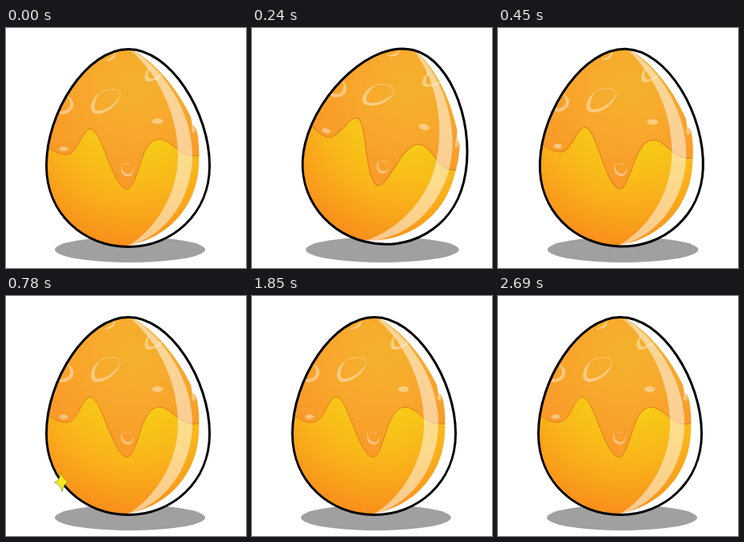
An HTML page for the animation above (3120 ms loop, 300 by 300 pixels).

```html
<!DOCTYPE html>
<html lang="en">
<head>
<meta charset="utf-8">
<title>Golden egg</title>
<style>
html, body { margin: 0; width: 100%; height: 100%; overflow: hidden; background: #fff; }
svg { display: block; width: 100vw; height: 100vh; }
</style>
</head>
<body>
<svg viewBox="0 0 300 300">
  <defs>
    <path id="shell" d="M153 26.5C205 26.5 254.5 105 254.5 172C254.5 232 208 273.5 153 273.5C97 273.5 50.5 232 50.5 172C50.5 105 101 26.5 153 26.5Z"/>
    <clipPath id="inside"><use href="#shell"/></clipPath>
    <radialGradient id="yolk" gradientUnits="userSpaceOnUse" cx="162" cy="100" r="175">
      <stop offset=".2" stop-color="#f6d015"/>
      <stop offset=".6" stop-color="#f9b61a"/>
      <stop offset="1" stop-color="#f98e1c"/>
    </radialGradient>
    <radialGradient id="glaze" gradientUnits="userSpaceOnUse" cx="160" cy="73" r="125">
      <stop offset="0" stop-color="#f1b12b"/>
      <stop offset=".35" stop-color="#f7ab2d"/>
      <stop offset="1" stop-color="#f99a28"/>
    </radialGradient>
    <path id="star" d="M0 -13.5Q2 -3 9.5 0Q2 3 0 13.5Q-2 3 -9.5 0Q-2 -3 0 -13.5Z" fill="#f4e825" stroke="#a39a1c" stroke-width=".9"/>
  </defs>

  <ellipse id="shadow" cx="155" cy="277" rx="94" ry="16" fill="#a0a0a0"/>

  <g id="egg">
    <g clip-path="url(#inside)">
      <rect x="40" y="20" width="225" height="260" fill="url(#yolk)"/>
      <path d="M45 139C54 153 70 161 80 157C92 150 95 128 105 126C119 125 132 195 150 201.500C163 204 167 151 184 141C202 131 214 160 234 160C242 160 250 157 262 150V10H40Z" fill="url(#glaze)" stroke="#dc7a1e" stroke-width="1"/>

      <g fill="#fff" fill-opacity=".4">
        <path d="M118 80C107 87 103 101 109 106C117 112 141 99 143 83C136 98 120 105 113 103C108 100 112 87 118 80Z"/>
        <path d="M76 85C88 89 88 106 70 108C66 107 64 105 62 103C79 107 85 96 76 85Z"/>
        <path d="M122 41C132 43 139 36 136 30C134 36 130 39 122 41Z"/>
        <path d="M180 47C171 57 172 67 178 67C187 67 196 60 199 52C193 60 184 65 180 63C176 61 177 54 180 47Z"/>
        <ellipse cx="189.500" cy="116.500" rx="7" ry="3.500"/>
        <ellipse cx="72" cy="151" rx="5.500" ry="3"/>
        <ellipse cx="234.500" cy="126" rx="2.500" ry="5"/>
        <path d="M145 170C138 189 163 191 159 174C159 187 144 185 145 170Z"/>
      </g>
      <path d="M118 80Q140 72 143 83M148 171Q152 168 156 172M67 88Q71 84 76 86" fill="none" stroke="#fff" stroke-opacity=".35"/>

      <path d="M153 26C191 43 233 102 233 158C233 208 206 258 150 274C188 252 215 206 215 160C215 102 185 51 153 26Z" fill="#fff" fill-opacity=".5"/>
      <path d="M150 24C184 38 213 74 231 111L233 122Q236 121 238 127C241 138 242 152 241 170C240 214 211 262 148 273V285H275V20Z" fill="#fff"/>
    </g>
    <use href="#shell" fill="none" stroke="#000" stroke-width="3"/>
  </g>

  <use id="low" href="#star"/>
  <use id="high" href="#star"/>
</svg>
<script>
const LOOP = 3120, STEP = 60, TWINKLE = 510;
const starts = [0, 270, 780, 1170, 1850, 2060, 2570];
// [time, degrees]
const rock = [[0, 0], [120, -10.5], [250, 14.3], [570, 0]];
const stars = [
  { id: 'low', x: 69.5, y: 232.5, sx: 1, sy: 1, at: [630, 2180] },
  { id: 'high', x: 219.5, y: 62, sx: 1.5, sy: 1.75, at: [780, 1850] }
];
const set = (id, value) => document.getElementById(id).setAttribute('transform', value);
const easeOut = u => 1 - (1 - u) ** 2;

function hold(t) {
  const s = starts.filter(v => v <= t).pop();
  return s + Math.floor((t - s) / STEP) * STEP;
}

function tilt(t) {
  const i = rock.findIndex(k => k[0] > t);
  if (i < 0) return 0;
  const [t0, a] = rock[i - 1], [t1, b] = rock[i];
  return a + (b - a) * easeOut((t - t0) / (t1 - t0));
}

function draw(time) {
  const t = hold(time % LOOP);
  const a = tilt(t), size = Math.abs(a);
  set('egg', `translate(${a * 1.3} ${-size * 0.19}) rotate(${a} 153 150)`);
  set('shadow', `translate(${155 + a * 0.56} 0) scale(${1 + size * 0.0014} 1) translate(-155 0)`);
  for (const s of stars) {
    const start = s.at.find(v => t > v && t < v + TWINKLE);
    const u = start === undefined ? 0 : (t - start) / TWINKLE;
    const k = u ? Math.sin(Math.PI * u) ** 0.6 * 1.03 : 0;
    set(s.id, `translate(${s.x} ${s.y}) rotate(${12 * u - 7}) scale(${k * s.sx} ${k * s.sy})`);
  }
}

const begin = performance.now();
function tick() {
  draw(performance.now() - begin);
  requestAnimationFrame(tick);
}
tick();
</script>
</body>
</html>
```
